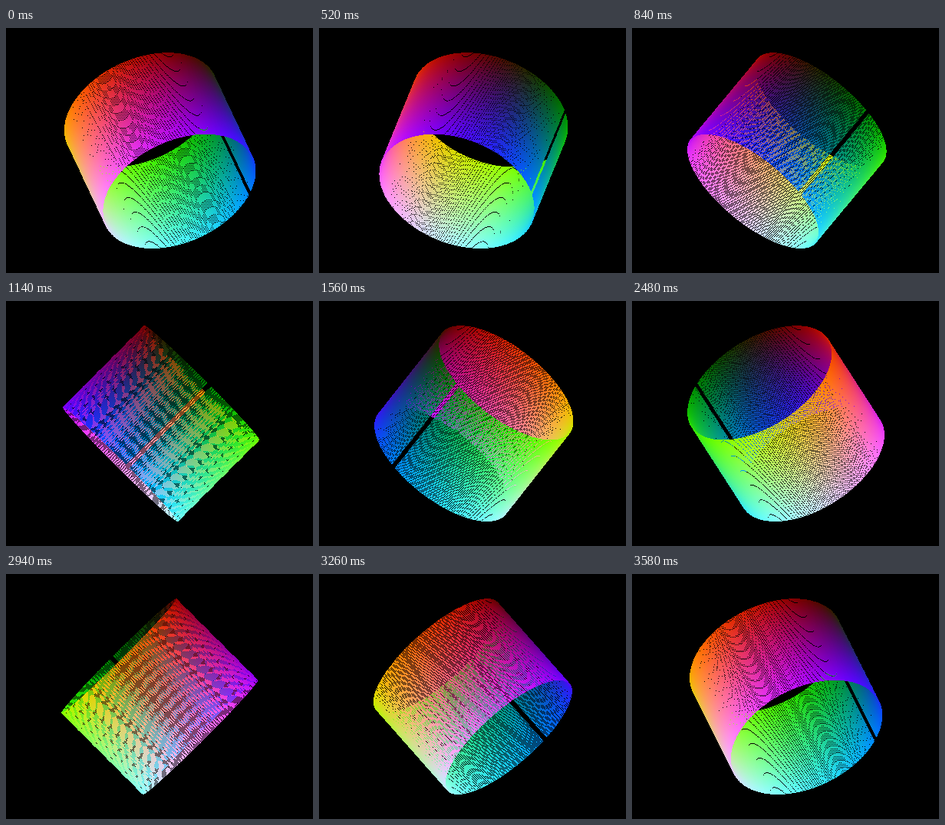
An HTML page with a canvas for the animation above (3600 ms loop, 400 by 320 pixels).

```html
<!DOCTYPE html>
<html lang="en">
<head>
<meta charset="utf-8">
<title>Rotating colour cylinder</title>
<style>
  html, body { margin: 0; width: 100%; height: 100%; overflow: hidden; background: #000; }
  canvas { display: block; width: 400px; height: 320px; image-rendering: pixelated; }
</style>
</head>
<body>
<canvas id="stage" width="400" height="320"></canvas>
<script>
const W = 400, H = 320;
const LOOP = 3600, TICK = 20;
const LENGTH = 149.2, RADIUS = LENGTH * Math.SQRT1_2;
const ROWS = 100, STEPS = 720, GAP = 7;  // a few steps stay open as the seam
const TILT = Math.SQRT1_2;               // axis leans 45 degrees

const ctx = document.getElementById('stage').getContext('2d');
const image = ctx.createImageData(W, H);
const pixels = new Uint32Array(image.data.buffer);
const depth = new Float32Array(W * H);
const BLACK = 0xff000000;

// Red and green follow the circle, blue follows the axis.
const ring = [];
for (let i = 0; i < STEPS - GAP; i++) {
  const a = -Math.PI + i * 2 * Math.PI / STEPS;
  const c = Math.cos(a), s = Math.sin(a);
  ring.push({
    u: RADIUS * c,
    v: RADIUS * s,
    rg: Math.round(127.5 + 127.5 * c) | Math.round(127.5 + 127.5 * s) << 8
  });
}

function draw(ms) {
  const frame = Math.floor(ms % LOOP / TICK);
  const phi = (62 + 2 * frame) * Math.PI / 180;
  const c = Math.cos(phi), s = Math.sin(phi);
  const cx = 200.6 - 0.9 * c, cy = 159.6;

  pixels.fill(BLACK);
  depth.fill(-1e9);

  for (const p of ring) {
    const x0 = cx - p.u * s - p.v * TILT * c;
    const y0 = cy + p.v * TILT;
    const z0 = p.u * c - p.v * TILT * s;
    for (let j = 0; j <= ROWS; j++) {
      const k = j / ROWS;
      const w = (k - 0.5) * LENGTH * TILT;
      const x = Math.round(x0 + w * c);
      const y = Math.round(y0 + w);
      const z = z0 + w * s;
      const at = y * W + x;
      if (z > depth[at]) {
        depth[at] = z;
        pixels[at] = BLACK | Math.round(255 * k) << 16 | p.rg;
      }
    }
  }
  ctx.putImageData(image, 0, 0);
}

const start = performance.now();
function tick() {
  draw(performance.now() - start);
  requestAnimationFrame(tick);
}
tick();
</script>
</body>
</html>
```
